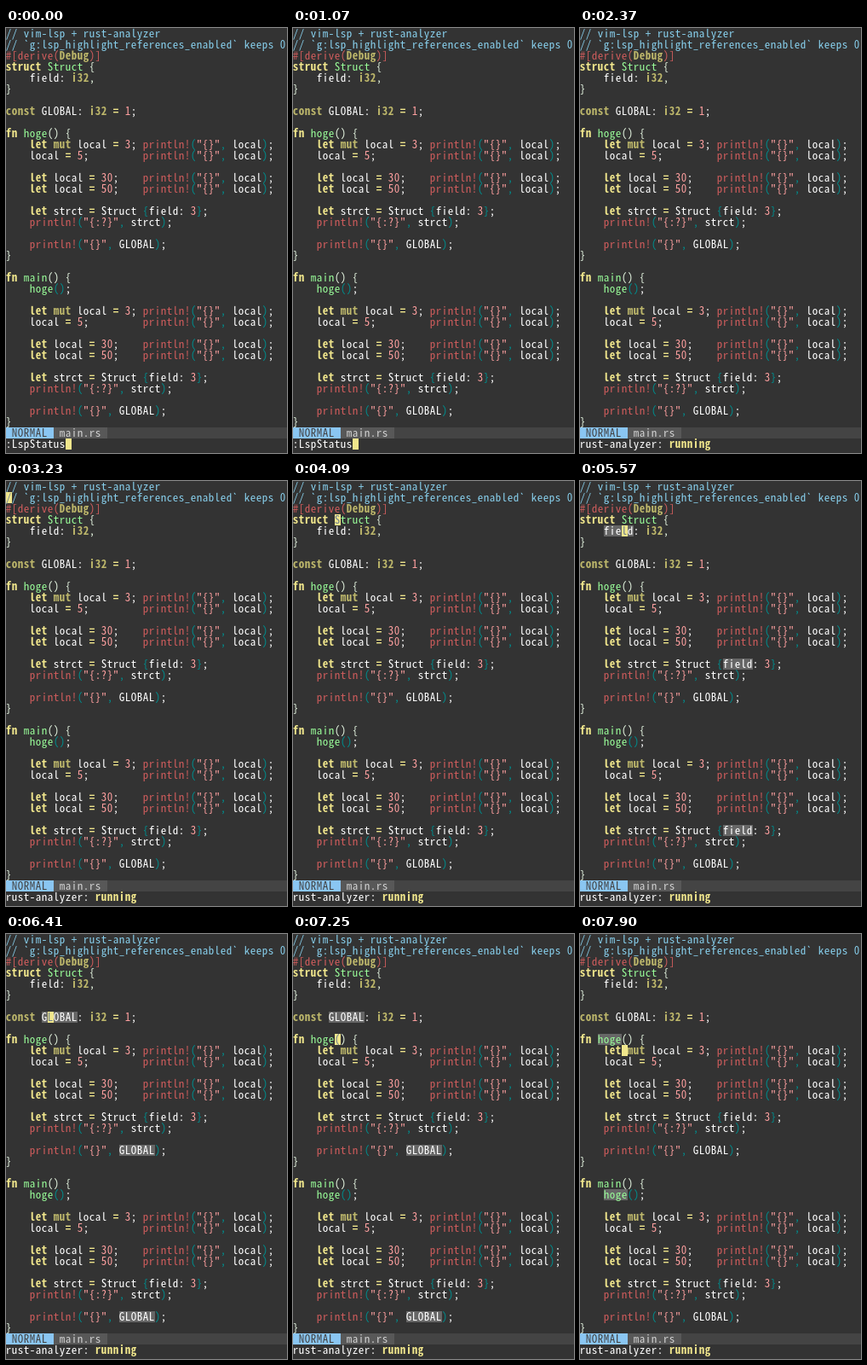
An HTML page with a canvas for the animation above (8000 ms loop, 330 by 498 pixels).

```html
<!DOCTYPE html>
<html lang="en">
<head>
<meta charset="utf-8">
<title>Editor reference highlights</title>
<style>
html, body { margin: 0; width: 330px; height: 498px; overflow: hidden; background: #333; }
canvas { display: block; }
</style>
</head>
<body>
<canvas id="stage" width="330" height="498"></canvas>
<script>
const ctx = document.getElementById('stage').getContext('2d');
const CELL_W = 7, CELL_H = 13, LOOP = 8000;
const STATUS_ROW = 36, COMMAND_ROW = 37;
const FAMILY = '"Noto Sans Mono CJK JP", "DejaVu Sans Mono", monospace';

const COLOR = {
  normal: '#ffffff', back: '#333333', comment: '#87ceeb', keyword: '#f0e68c',
  type: '#bdb76b', name: '#98fb98', macro: '#cd5c5c', literal: '#ffa0a0',
  outer: '#e4f4e0', inner: '#008b8b', reference: '#666666',
  cursor: '#f0e68c', cursorText: '#708090'
};

const body = `    let mut local = 3; println!("{}", local);
    local = 5;         println!("{}", local);

    let local = 30;    println!("{}", local);
    let local = 50;    println!("{}", local);

    let strct = Struct {field: 3};
    println!("{:?}", strct);

    println!("{}", GLOBAL);
}`;

const source = `// vim-lsp + rust-analyzer
// \`g:lsp_highlight_references_enabled\` keeps 0
#[derive(Debug)]
struct Struct {
    field: i32,
}

const GLOBAL: i32 = 1;

fn hoge() {
${body}

fn main() {
    hoge();

${body}`.split('\n');

// [row, column, length]
const REFS = {
  none: [],
  struct: [[3, 7, 6], [16, 16, 6], [31, 16, 6]],
  field: [[4, 4, 5], [16, 24, 5], [31, 24, 5]],
  global: [[7, 6, 6], [19, 19, 6], [34, 19, 6]],
  hoge: [[9, 3, 4], [23, 4, 4]]
};

// [start time, cursor row and column or null while blinked off, highlighted references]
const PROMPT = [COMMAND_ROW, 10];
const TIMELINE = [
  [0, PROMPT, 'none'],
  [210, null, 'none'],
  [430, PROMPT, 'none'],
  [860, null, 'none'],
  [1070, PROMPT, 'none'],
  [1500, [0, 0], 'none'],
  [2370, null, 'none'],
  [2580, [0, 0], 'none'],
  [3010, null, 'none'],
  [3220, [1, 0], 'none'],
  [3440, [2, 0], 'none'],
  [4090, [3, 7], 'none'],
  [4310, [3, 7], 'struct'],
  [4740, null, 'struct'],
  [5140, [3, 7], 'struct'],
  [5350, [4, 7], 'struct'],
  [5570, [4, 7], 'field'],
  [6000, [5, 0], 'field'],
  [6210, [7, 7], 'field'],
  [6410, [7, 7], 'global'],
  [6830, [8, 0], 'global'],
  [7040, [9, 7], 'global'],
  [7260, [9, 6], 'global'],
  [7480, [9, 6], 'hoge'],
  [7700, [10, 6], 'hoge'],
  [7900, [10, 7], 'hoge']
];

ctx.font = `100px ${FAMILY}`;
const fontSize = Math.min(13, CELL_W * 100 / ctx.measureText('M').width);

const TOKEN = /"[^"]*"|\w+!?|\s+|./g;
let depth = 0;

// Brackets, and commas inside them, are coloured by nesting level.
function nestingStyle(char) {
  if ('{('.includes(char)) depth++;
  const style = depth > 1 ? 'inner' : 'outer';
  if ('})'.includes(char)) depth--;
  return style;
}

function styleOf(token, previous) {
  if (/^[{}(),]$/.test(token)) return nestingStyle(token);
  if (/^["\d]/.test(token)) return 'literal';
  if (token.length > 1 && token.endsWith('!')) return 'macro';
  if (/^(struct|fn|let|=)$/.test(token)) return 'keyword';
  if (/^(const|mut|i32|Debug)$/.test(token)) return 'type';
  if (/^(struct|fn)$/.test(previous) || token === 'hoge') return 'name';
  return 'normal';
}

function highlight(line) {
  if (line.startsWith('//')) return [[line, 'comment']];
  if (line.startsWith('#')) {
    return line.split(/(Debug)/).map(part => [part, part === 'Debug' ? 'type' : 'macro']);
  }
  let previous = '';
  return (line.match(TOKEN) || []).map(token => {
    const style = styleOf(token, previous);
    if (token.trim()) previous = token;
    return [token, style];
  });
}

const lines = source.map(highlight);

function fillCells(row, col, count, color) {
  ctx.fillStyle = color;
  ctx.fillRect(col * CELL_W, row * CELL_H, count * CELL_W, CELL_H);
}

function drawText(row, col, text, color, bold = false) {
  ctx.font = `${bold ? 'bold ' : ''}${fontSize}px ${FAMILY}`;
  ctx.fillStyle = color;
  [...text].forEach((char, i) => {
    ctx.fillText(char, (col + i) * CELL_W + 3, row * CELL_H + 11);
  });
}

function drawTokens(row, tokens) {
  let col = 0;
  for (const [text, style] of tokens) {
    drawText(row, col, text, COLOR[style], style === 'keyword' || style === 'type');
    col += text.length;
  }
}

function drawStatus() {
  fillCells(STATUS_ROW, 0, 48, '#444444');
  fillCells(STATUS_ROW, 0, 8, '#8ac6f2');
  fillCells(STATUS_ROW, 8, 9, '#585858');
  drawText(STATUS_ROW, 1, 'NORMAL', '#444444');
  drawText(STATUS_ROW, 9, 'main.rs', '#d0d0d0');
}

function drawCursor([row, col]) {
  fillCells(row, col, 1, COLOR.cursor);
  const char = (source[row] || '')[col];
  if (char) drawText(row, col, char, COLOR.cursorText);
}

function draw(time) {
  const [, cursor, refs] = TIMELINE.findLast(([start]) => start <= time);
  ctx.textAlign = 'center';
  ctx.fillStyle = COLOR.back;
  ctx.fillRect(0, 0, 330, 498);
  for (const [row, col, count] of REFS[refs]) fillCells(row, col, count, COLOR.reference);
  lines.forEach((tokens, row) => drawTokens(row, tokens));
  drawStatus();
  drawTokens(COMMAND_ROW, time < 1500
    ? [[':LspStatus', 'normal']]
    : [['rust-analyzer: ', 'normal'], ['running', 'keyword']]);
  if (cursor) drawCursor(cursor);
}

const begin = performance.now();
function tick() {
  draw((performance.now() - begin) % LOOP);
  requestAnimationFrame(tick);
}
tick();
</script>
</body>
</html>
```
